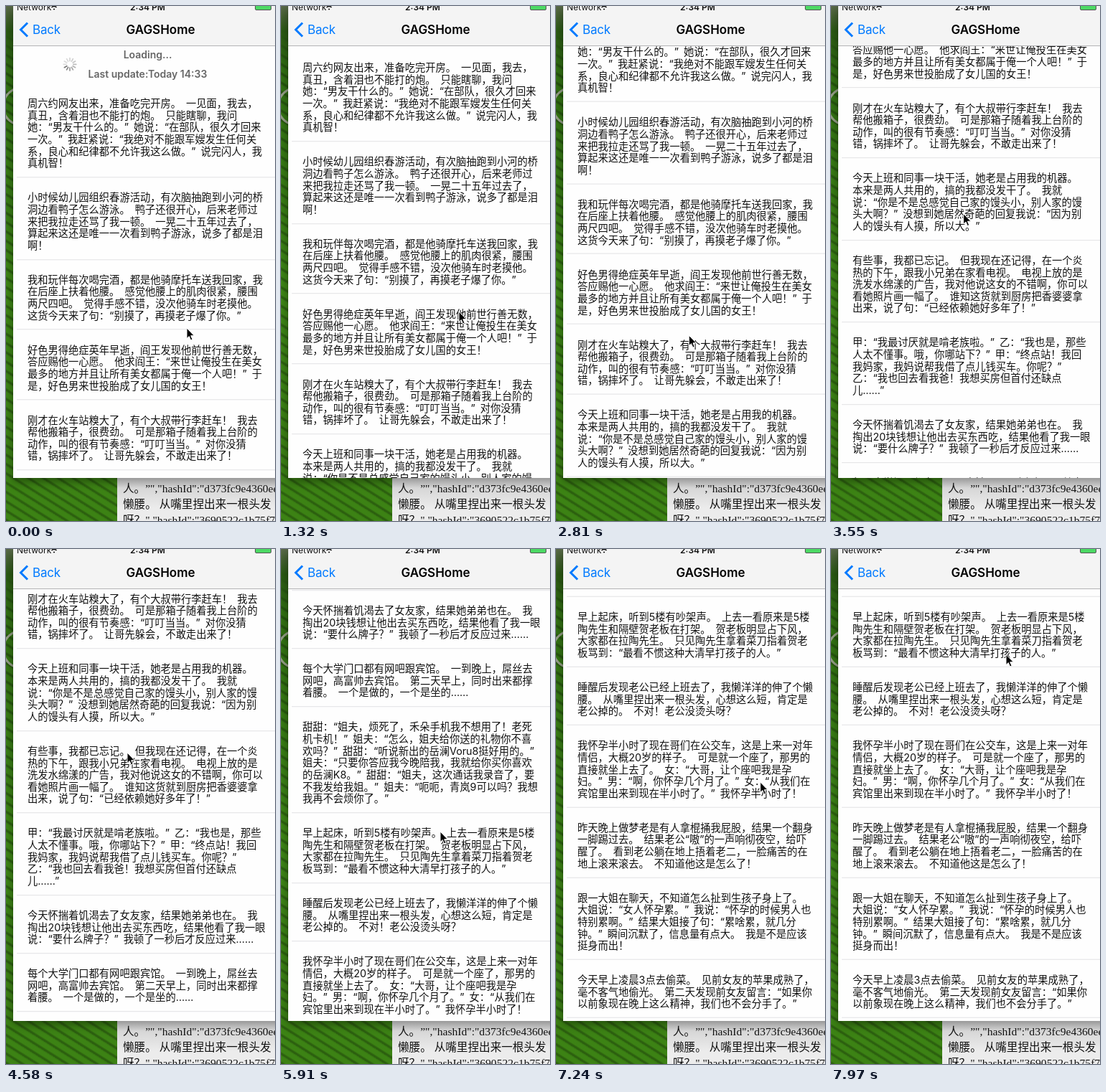
An HTML page for the animation above (8000 ms loop, 375x718 px).

```html
<!DOCTYPE html>
<html lang="zh-CN">
<head>
<meta charset="utf-8">
<style>
html, body { margin: 0; width: 100%; height: 100%; overflow: hidden; }
body { position: relative; font-family: Inter, "Noto Sans CJK SC", sans-serif; text-autospace: no-autospace; text-spacing-trim: space-all; }
div, svg, span { position: absolute; white-space: pre; }
#field { inset: 0; background:
  linear-gradient(#5b6b4a 0, #2c5c14 35px, transparent 90px),
  radial-gradient(circle at 22px 140px, transparent 24px, #9aa48c 25px 27px, transparent 28px),
  repeating-linear-gradient(32deg, #0004 0 2px, transparent 4px 9px, #0002 11px),
  linear-gradient(#2f6d12, #3f8a16 55%, #3c8214); }
#editor { left: 155px; top: 640px; width: 220px; height: 78px; overflow: hidden; color: #111;
  background: linear-gradient(#999 18px, #d6d6d6 32px, #ececec 60px);
  font: 15.6px/22px "Liberation Serif", "Noto Sans CJK SC", serif; }
#phone { left: 10px; top: 0; width: 375px; height: 658px; overflow: hidden; background: #fefefe; }
#shade { left: 10px; top: 0; width: 375px; height: 658px; box-shadow: 0 4px 14px #0007; }
#list { left: 0; top: 0; width: 375px; }
.cell { left: 0; width: 375px; font-size: 14.27px; line-height: 16.62px; color: #111; word-spacing: 3px; }
.cell span { left: 20px; top: 20.2px; }
.cell::after { content: ""; position: absolute; left: 5px; right: 0; bottom: 0; height: 1px; background: #e2e2e4; }
.head { width: 375px; text-align: center; font-weight: 600; font-size: 14px; line-height: 20px; color: #666; }
#nav { left: 0; top: 0; width: 375px; height: 55px; background: #f4f4f4; border-bottom: 1px solid #b4b4b6; }
#nav span { line-height: 20px; }
#title { width: 375px; top: 23px; text-align: center; font-size: 17px; font-weight: 600; color: #000; }
#back { left: 27px; top: 23px; font-size: 17px; letter-spacing: -.2px; color: #007aff; }
.status { top: -8px; font-size: 12px; color: #111; }
#battery { left: 337px; top: -6px; width: 21px; height: 10px; background: #4cd964; border: 1px solid #555; border-radius: 2px; }
</style>
</head>
<body>
<div id="field"></div>
<div id="shade"></div>
<div id="editor"><span style="left:8px;top:22px">人。”","hashId":"d373fc9e4360ee71
懒腰。 从嘴里捏出来一根头发
呀&#xff1f;","hashId":"3690522c1b75f7a2</span></div>
<div id="phone">
  <div id="list">
    <div class="head" style="top:-50px">Loading...</div>
    <div class="head" style="top:-23px">Last update:Today 14:33</div>
    <svg id="spinner" style="left:69px;top:-37px" width="20" height="20" viewBox="-10 -10 20 20" stroke-width="1.7" stroke-linecap="round"></svg>
  </div>
  <div id="nav">
    <span class="status" style="left:5px">Network</span>
    <span class="status" style="left:0;width:375px;text-align:center;font-weight:600">2:34 PM</span>
    <svg style="left:50px;top:-5px" width="14" height="11" fill="none" stroke="#111" stroke-width="1.6"><path d="M1 4Q7-1 13 4M3.5 7Q7 4 10.5 7M6 9.5h2"/></svg>
    <div id="battery"></div>
    <svg style="left:8px;top:22px" width="14" height="22" fill="none" stroke="#007aff" stroke-width="3"><path d="M12 1.5 2.5 11 12 20.5"/></svg>
    <span id="back">Back</span>
    <span id="title">GAGSHome</span>
  </div>
</div>
<svg id="cursor" style="left:0;top:0" width="14" height="20"><path d="M1 1v14.5l3.3-3 2.3 5.5 2.4-1-2.3-5.3h4.6z" fill="#000" stroke="#fff"/></svg>
<script>
const jokes = `周六约网友出来,准备吃完开房。 一见面,我去,
真丑,含着泪也不能打的炮。 只能瞎聊,我问
她:“男友干什么的。” 她说:“在部队,很久才回来
一次。” 我赶紧说:“我绝对不能跟军嫂发生任何关
系,良心和纪律都不允许我这么做。” 说完闪人,我
真机智!

小时候幼儿园组织春游活动,有次脑抽跑到小河的桥
洞边看鸭子怎么游泳。 鸭子还很开心,后来老师过
来把我拉走还骂了我一顿。 一晃二十五年过去了,
算起来这还是唯一一次看到鸭子游泳,说多了都是泪
啊!

我和玩伴每次喝完酒,都是他骑摩托车送我回家,我
在后座上扶着他腰。 感觉他腰上的肌肉很紧,腰围
两尺四吧。 觉得手感不错,没次他骑车时老摸他。
这货今天来了句:“别摸了,再摸老子爆了你。”

好色男得绝症英年早逝,阎王发现他前世行善无数,
答应赐他一心愿。 他求阎王:“来世让俺投生在美女
最多的地方并且让所有美女都属于俺一个人吧!” 于
是,好色男来世投胎成了女儿国的女王!

刚才在火车站糗大了,有个大叔带行李赶车! 我去
帮他搬箱子,很费劲。 可是那箱子随着我上台阶的
动作,叫的很有节奏感:“叮叮当当。” 对你没猜
错,锅摔坏了。 让哥先躲会,不敢走出来了!

今天上班和同事一块干活,她老是占用我的机器。
本来是两人共用的,搞的我都没发干了。 我就
说:“你是不是总感觉自己家的馒头小,别人家的馒
头大啊?” 没想到她居然奇葩的回复我说:“因为别
人的馒头有人摸,所以大。”

有些事,我都已忘记。 但我现在还记得,在一个炎
热的下午,跟我小兄弟在家看电视。 电视上放的是
洗发水绵漾的广告,我对他说这女的不错啊,你可以
看她照片画一幅了。 谁知这货就到厨房把香婆婆拿
出来,说了句:“已经依赖她好多年了!”

甲:“我最讨厌就是啃老族啦。” 乙:“我也是,那些
人太不懂事。哦,你哪站下?” 甲:“终点站!我回
我妈家,我妈说帮我借了点儿钱买车。你呢?”
乙:“我也回去看我爸!我想买房但首付还缺点
儿……”

今天怀揣着饥渴去了女友家,结果她弟弟也在。 我
掏出20块钱想让他出去买东西吃,结果他看了我一眼
说:“要什么牌子?” 我顿了一秒后才反应过来……

每个大学门口都有网吧跟宾馆。 一到晚上,屌丝去
网吧,高富帅去宾馆。 第二天早上,同时出来都撑
着腰。 一个是做的,一个是坐的……

甜甜:“姐夫,烦死了,禾朵手机我不想用了!老死
机卡机!” 姐夫:“怎么,姐夫给你送的礼物你不喜
欢吗?” 甜甜:“听说新出的岳澜Voru8挺好用的。”
姐夫:“只要你答应我今晚陪我,我就给你买你喜欢
的岳澜K8。” 甜甜:“姐夫,这次通话我录音了,要
不我发给我姐。” 姐夫:“呃呃,青岚9可以吗?我想
我再不会烦你了。”

早上起床,听到5楼有吵架声。 上去一看原来是5楼
陶先生和隔壁贺老板在打架。 贺老板明显占下风,
大家都在拉陶先生。 只见陶先生拿着菜刀指着贺老
板骂到:“最看不惯这种大清早打孩子的人。”

睡醒后发现老公已经上班去了,我懒洋洋的伸了个懒
腰。 从嘴里捏出来一根头发,心想这么短,肯定是
老公掉的。 不对!老公没烫头呀?

我怀孕半小时了现在哥们在公交车,这是上来一对年
情侣,大概20岁的样子。 可是就一个座了,那男的
直接就坐上去了。 女:“大哥,让个座吧我是孕
妇。” 男:“啊,你怀孕几个月了。” 女:“从我们在
宾馆里出来到现在半小时了。” 我怀孕半小时了!

昨天晚上做梦老是有人拿棍捅我屁股,结果一个翻身
一脚踢过去。 结果老公“嗷”的一声响彻夜空,给吓
醒了。 看到老公躺在地上捂着老二,一脸痛苦的在
地上滚来滚去。 不知道他这是怎么了!

跟一大姐在聊天,不知道怎么扯到生孩子身上了。
大姐说:“女人怀孕累。” 我说:“怀孕的时候男人也
特别累啊。” 结果大姐接了句:“累啥累,就几分
钟。” 瞬间沉默了,信息量有点大。 我是不是应该
挺身而出!

今天早上凌晨3点去偷菜。 见前女友的苹果成熟了,
毫不客气地偷光。 第二天发现前女友留言:“如果你
以前象现在晚上这么精神,我们也不会分手了。”`;

// ASCII punctuation to its full-width form
const widen = text => text.replace(/[,:!?]/g, c => String.fromCharCode(c.charCodeAt(0) + 0xfee0));

const $ = id => document.getElementById(id);
const TICK = 147.75, LOOP = 8000;

let y = 0;
for (const joke of jokes.split("\n\n")) {
  const cell = document.createElement("div"), text = document.createElement("span");
  const height = 31.4 + 16.62 * joke.split("\n").length;
  cell.className = "cell";
  cell.style.top = y + "px";
  cell.style.height = height + "px";
  text.textContent = widen(joke);
  cell.append(text);
  $("list").append(cell);
  y += height;
}

$("spinner").innerHTML = Array.from({ length: 12 }, (_, i) =>
  `<path d="M0-4.8V-8.8" stroke="#777" opacity="${0.25 + 0.75 * (i / 11) ** 2}" transform="rotate(${i * 30})"/>`).join("");

const clamp = p => Math.min(1, Math.max(0, p));
const easeOut = p => 1 - (1 - clamp(p)) ** 3;
const smooth = p => p * p * (3 - 2 * p);

// The list starts pulled down; the header closes, then each swipe coasts to rest.
const START = 108.3;
const swipes = [
  { start: 7, length: 3.3, distance: 53.3 },
  { start: 18.52, length: 12, distance: 454.8 },
  { start: 35, length: 3.9, distance: 425 },
  { start: 40, length: 2, distance: 7.2 },
  { start: 43, length: 5.5, distance: 294.3 },
];
const listTop = tick => swipes.reduce((top, s) => top - s.distance * easeOut((tick - s.start) / s.length), START);

// Pointer stops: tick, x, y
const stops = [[0, 251, 448], [9, 247, 425], [14, 241, 421], [18, 183, 517], [21, 188, 290], [31, 168, 283],
  [35, 200, 520], [40, 221, 393], [43, 300, 515], [46, 311, 289], [51, 269, 343], [54, 243, 146]];

function pointerAt(tick) {
  const i = Math.max(1, stops.findIndex(s => s[0] >= tick));
  const [t0, x0, y0] = stops[i - 1], [t1, x1, y1] = stops[i];
  const p = smooth(clamp((tick - t0) / (t1 - t0)));
  return [x0 + (x1 - x0) * p, y0 + (y1 - y0) * p];
}

function draw(now) {
  const tick = Math.floor((now % LOOP + 13) / TICK);
  const [px, py] = pointerAt(tick);
  $("list").style.transform = `translateY(${listTop(tick)}px)`;
  $("cursor").style.transform = `translate(${px}px, ${py}px)`;
  $("spinner").style.transform = `rotate(${Math.floor(tick * TICK / 83.3) * 30 - 90}deg)`;
  requestAnimationFrame(draw);
}
draw(0);
</script>
</body>
</html>
```
